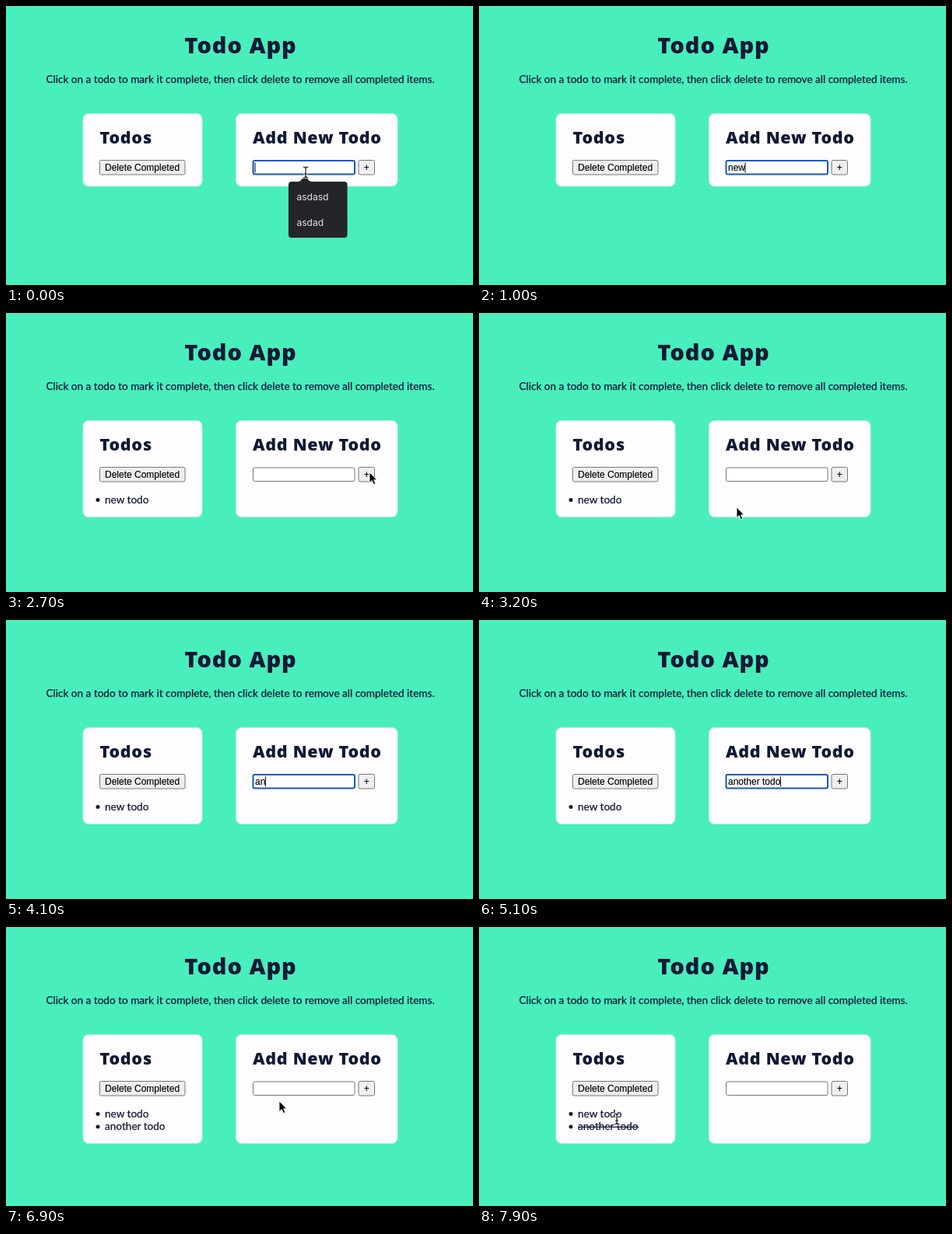
An HTML page that plays this animation: 600 px wide and 359 px high, repeating every 8 s.

```html
<!DOCTYPE html>
<html lang="en">
<head>
<meta charset="utf-8">
<title>Todo App</title>
<style>
  html, body { margin: 0; width: 100%; height: 100%; overflow: hidden; background: #49eebd; }
  svg { display: block; width: 100%; height: 100%; }
  text { white-space: pre; }
  .heading { font: 800 21.5px "Open Sans", sans-serif; letter-spacing: .033em; fill: #101935; }
  .title { font-size: 29px; }
  .body { font: 13.6px Lato, sans-serif; fill: #101935; stroke: #101935; stroke-width: .25; }
  .control { font: 12px "Liberation Sans", Arial, sans-serif; fill: #000; stroke: #000; stroke-width: .15; }
  .option { font: 12px Inter, sans-serif; fill: #e4e4e6; }
  .card { fill: #fffdff; stroke: #b9f2e2; }
  .button { fill: #efeff0; stroke: #77777b; }
  .button.pressed { fill: #f6f6f7; }
  .field { fill: #fff; stroke: #77777b; }
  .field.focused { stroke: #1559bd; stroke-width: 2; }
</style>
</head>
<body>
<svg viewBox="0 0 600 359">
  <text class="heading title" x="301.5" y="60.5" text-anchor="middle">Todo App</text>
  <text class="body" x="301" y="99" text-anchor="middle">Click on a todo to mark it complete, then click delete to remove all completed items.</text>

  <rect class="card" x="99" y="138.5" width="153" height="93.5" rx="7"/>
  <rect class="card" x="295.5" y="138.5" width="207.5" height="93.5" rx="7"/>

  <text class="heading" x="120.5" y="176.5">Todos</text>
  <rect class="button" x="120.5" y="198.5" width="109.5" height="18.5" rx="2"/>
  <text class="control" x="127" y="212">Delete Completed</text>

  <text class="heading" x="317" y="176.5">Add New Todo</text>
  <rect class="field" id="field" x="317.5" y="199" width="130.5" height="17.5" rx="2"/>
  <text class="control" id="typed" x="320" y="212"></text>
  <rect id="caret" y="201.5" width="1" height="13"/>
  <rect class="button" id="plus" x="453" y="198.5" width="20.5" height="18.5" rx="2"/>
  <text class="control" x="463.2" y="212" text-anchor="middle">+</text>

  <g class="item">
    <circle cx="118" cy="240.5" r="2.5" fill="#101935"/>
    <text class="body" x="127" y="245">new todo</text>
  </g>
  <g class="item">
    <circle cx="118" cy="257" r="2.5" fill="#101935"/>
    <text class="body" x="127" y="261">another todo</text>
    <path id="strike" d="M127 257.3H205" stroke="#101935" stroke-width="1.2"/>
  </g>

  <g id="popup">
    <rect x="362.5" y="227" width="76" height="72" rx="4" fill="#000" opacity=".15"/>
    <path d="M367 226H375C380 226 381 219.5 384 219.5S388 226 393 226H434.5Q438.5 226 438.5 230V294Q438.5 298 434.5 298H367Q363 298 363 294V230Q363 226 367 226Z" fill="#252428"/>
    <text class="option" x="373.5" y="250">asdasd</text>
    <text class="option" x="373.5" y="283">asdad</text>
  </g>

  <path id="arrow" d="M0 0V13.5L3.2 10.6L5.4 15.6L7.8 14.5L5.6 9.8H9.6Z" fill="#000" stroke="#fff" stroke-width=".9"/>
  <g id="beam" fill="none" stroke-linecap="round">
    <path d="M-3-7Q0-7 0-4.5Q0-7 3-7M0-4.5V4.5M-3 7Q0 7 0 4.5Q0 7 3 7M-1.5 2H1.5" stroke="#fff" stroke-width="2.4"/>
    <path d="M-3-7Q0-7 0-4.5Q0-7 3-7M0-4.5V4.5M-3 7Q0 7 0 4.5Q0 7 3 7M-1.5 2H1.5" stroke="#000" stroke-width="1.1"/>
  </g>
</svg>
<script>
const LOOP = 8000;
const $ = id => document.getElementById(id);
const show = (el, on) => el.style.display = on ? '' : 'none';
const within = (v, from, to) => v >= from && v < to;

// Pointer stops: time, x, y
const pointerPath = [
  [0, 385, 214], [1550, 385, 214], [1900, 543, 213], [2050, 547, 219],
  [2250, 530, 215], [2500, 467, 205], [2750, 467, 205], [3200, 331, 250],
  [3500, 385, 212], [5150, 385, 212], [5500, 547, 203], [5850, 467, 205],
  [6200, 467, 205], [6900, 351, 224], [7400, 177, 252], [7600, 177, 252],
  [7800, 177, 247], [LOOP, 177, 247]
];

// Each entry is typed at a steady pace, then cleared on submit.
const entries = [
  { text: 'new todo', start: 700, step: 105, submit: 2650 },
  { text: 'another todo', start: 3960, step: 100, submit: 6100 }
];

const cards = document.querySelectorAll('.card');
const items = document.querySelectorAll('.item');

function pointerAt(t) {
  const i = pointerPath.findIndex(stop => stop[0] > t);
  const [t0, x0, y0] = pointerPath[i - 1];
  const [t1, x1, y1] = pointerPath[i];
  const u = (t - t0) / (t1 - t0);
  const e = u * u * (3 - 2 * u);
  return [x0 + (x1 - x0) * e, y0 + (y1 - y0) * e];
}

function drawField(t) {
  let value = '', lastKey = t < 3000 ? -100 : 3450;
  for (const { text, start, step, submit } of entries) {
    if (!within(t, start, submit)) continue;
    const count = Math.min(text.length, 1 + Math.floor((t - start) / step));
    value = text.slice(0, count);
    lastKey = start + (count - 1) * step;
  }
  const focused = t < 2500 || within(t, 3450, 5900);
  $('typed').textContent = value;
  $('field').classList.toggle('focused', focused);
  show($('caret'), focused && (t - lastKey) % 1000 < 500);
  $('caret').setAttribute('x', 319.5 + $('typed').getComputedTextLength());
  $('plus').classList.toggle('pressed', within(t, 2500, 2650) || within(t, 5900, 6100));
  show($('popup'), t < 700 || within(t, 3500, 4060));
}

function drawList(t) {
  const count = entries.filter(entry => t >= entry.submit).length;
  items.forEach((item, i) => show(item, i < count));
  cards.forEach(card => card.setAttribute('height', [93.5, 124, 140][count]));
  show($('strike'), t >= 7500);
}

function drawPointer(t) {
  const [x, y] = pointerAt(t);
  const hidden = within(t, 700, 1550) || within(t, 3960, 5200);
  const overField = within(x, 317, 448) && within(y, 199, 218);
  const overItem = within(x, 127, 205) && within(y, 234, 264);
  const textCursor = overField || overItem;
  show($('beam'), !hidden && textCursor);
  show($('arrow'), !hidden && !textCursor);
  for (const id of ['beam', 'arrow']) $(id).setAttribute('transform', `translate(${x} ${y})`);
}

const origin = performance.now();
function draw() {
  const t = (performance.now() - origin) % LOOP;
  drawField(t);
  drawList(t);
  drawPointer(t);
  requestAnimationFrame(draw);
}
draw();
</script>
</body>
</html>
```
